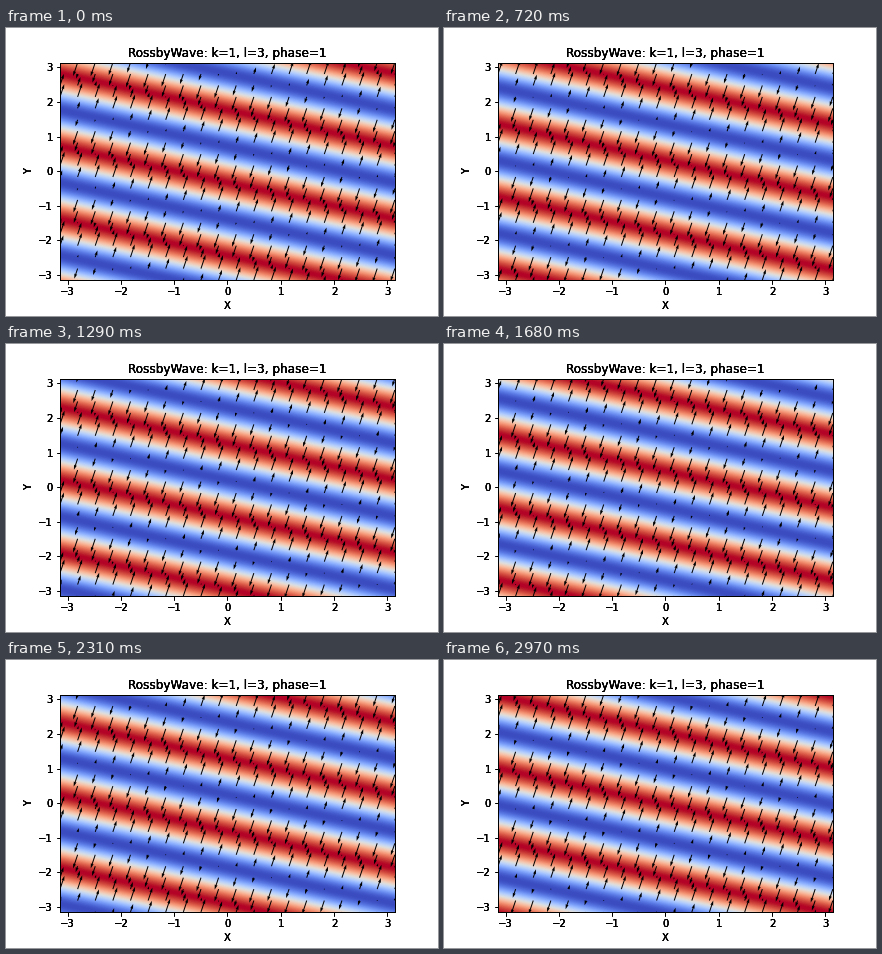
Recreate the animation shown at these times as a matplotlib script. Size 432 by 288 pixels, loop 3000 ms.

```python
import numpy as np
import matplotlib.pyplot as plt
from matplotlib.animation import FuncAnimation

FRAMES, INTERVAL = 100, 30
K, L, PHASE, BETA = 1, 3, 1, 2
OMEGA = -BETA * K / (K**2 + L**2 + 1)
PI = np.pi
LAYERS = 4  # stacked frames and labels give the text its heavy edges

plt.rcParams.update({"font.family": "DejaVu Sans", "font.size": 10})


def centres(n):
    return (np.arange(n) + 0.5) / n * 2 * PI - PI


def theta(x, y, t):
    return K * x + L * y - OMEGA * t + PHASE


def gradient(t):
    s = -np.sin(theta(gx, gy, t))
    return K * s, L * s


def add_layer(fig):
    ax = fig.add_axes([0.125, 0.125, 0.775, 0.755], facecolor="none")
    ax.set(xlim=(-PI, PI), ylim=(-PI, PI), xlabel="X", ylabel="Y",
           xticks=range(-3, 4), yticks=range(-3, 4))
    ax.set_title(f"RossbyWave: k={K}, l={L}, phase={PHASE}", fontsize=12)
    return ax


fig = plt.figure(figsize=(6, 4), dpi=72, facecolor="white")
ax = [add_layer(fig) for _ in range(LAYERS)][0]

px, py = np.meshgrid(centres(335), centres(217))
grid = np.linspace(-PI, PI, 20)
gx, gy = np.meshgrid(grid, grid)

field = ax.imshow(np.cos(theta(px, py, 0)), cmap="coolwarm", vmin=-1, vmax=1,
                  extent=(-PI, PI, -PI, PI), origin="lower", aspect="auto")
u, v = gradient(0)
arrows = ax.quiver(gx, gy, u, v, units="width", width=0.003,
                   scale=1.8 * len(grid) * np.hypot(u, v).mean())


def update(t):
    field.set_data(np.cos(theta(px, py, t)))
    arrows.set_UVC(*gradient(t))
    return field, arrows


anim = FuncAnimation(fig, update, frames=FRAMES, interval=INTERVAL,
                     init_func=lambda: update(0), repeat=True, repeat_delay=0)
plt.show()
```
